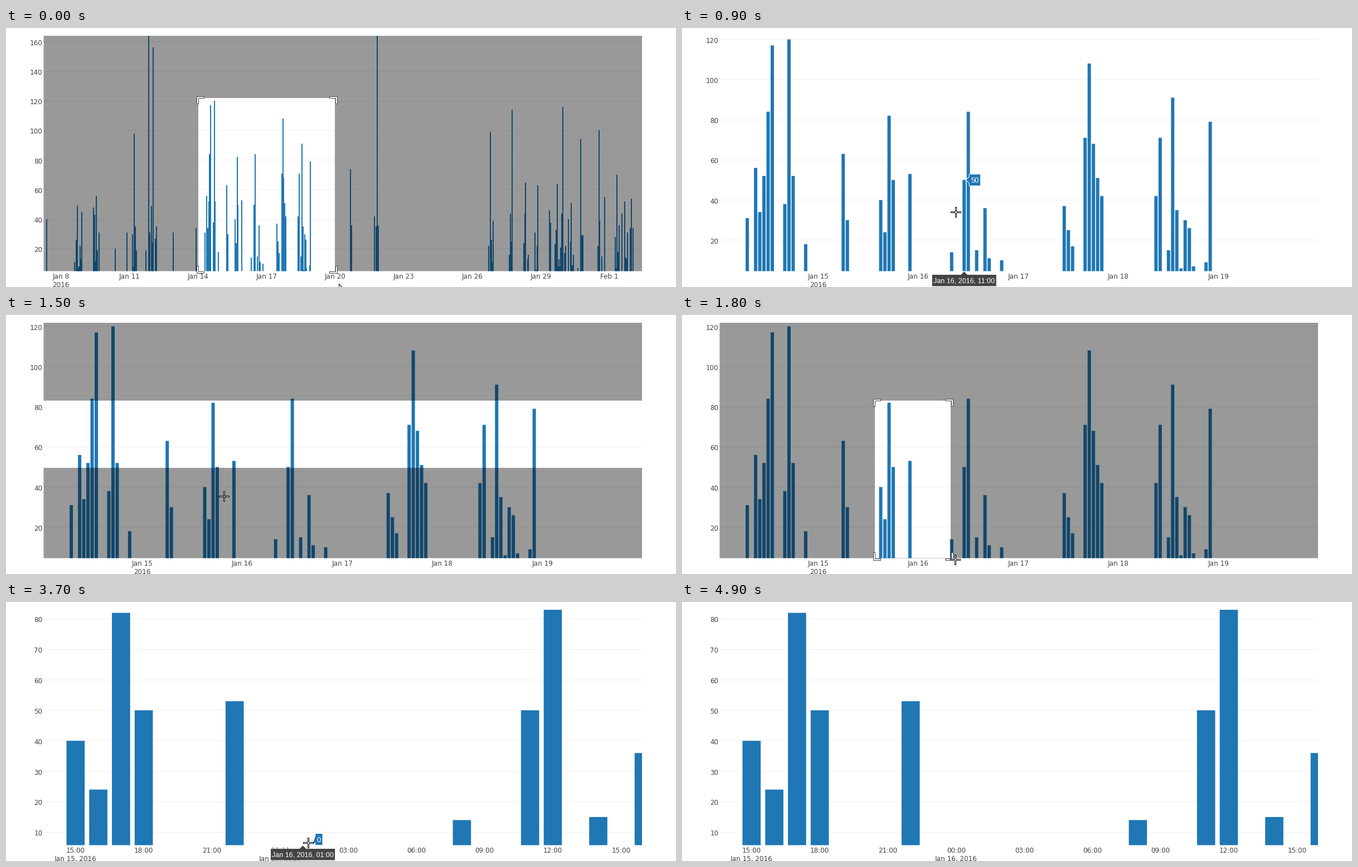
Write a matplotlib script that moves like this. It is 1202 px wide and 466 px high and loops after 5300 ms.

```python
import math
import random

import numpy as np
import matplotlib.pyplot as plt
from matplotlib.animation import FuncAnimation
from matplotlib.collections import PolyCollection
from matplotlib.patches import Polygon

W, H, DPI = 1202, 466, 100
PX = 72 / DPI
LEFT, TOP, RIGHT, BOTTOM = 67.5, 14, 1141, 437.5
BLUE, INK = "#1f77b4", "#444444"
START = (346, 154)  # where the drag begins
LAG = 0.68  # share of the latest pointer step the chart has caught up with

# The zoomed week: runs of hourly counts, keyed by hours from Jan 14
WEEK_RUNS = {
    7: [31], 9: [56, 34, 52, 84, 117], 16: [38, 120, 52], 21: [18],
    30: [63, 30], 39: [40, 24, 82, 50], 46: [53], 56: [14], 59: [50, 84],
    62: [15], 64: [36, 11], 68: [10], 83: [37, 25, 17],
    88: [71, 108, 68, 51, 42], 105: [42, 71],
    108: [15, 91, 35, 6, 30, 26, 7], 117: [9, 79],
}
# Busiest hours before and after it; quieter hours scatter around them
PEAKS = {
    -159: 40, -127: 49, -122: 45, -107: 56, -87: 20, -75: 31, -67: 98,
    -52: 170, -47: 156, -26: 31, -2: 34, 160: 74, 188: 170, 307: 99,
    330: 114, 344: 65, 357: 63, 369: 46, 377: 64, 383: 116, 392: 51,
    402: 94, 421: 100, 427: 55, 440: 70, 448: 52, 455: 54,
}


def hourly_counts():
    counts = {h + k: v for h, run in WEEK_RUNS.items()
              for k, v in enumerate(run)}
    counts.update(PEAKS)
    rng = random.Random(7)
    for hour, peak in PEAKS.items():
        for k in (-3, -2, -1, 1, 2, 3):
            if peak > 40 and rng.random() < 0.5:
                quiet = round(min(peak, 55) * rng.uniform(0.1, 0.9))
                counts.setdefault(hour + k, quiet)
    return counts


COUNTS = hourly_counts()

# Pointer moves: first frame, last frame, end point, ease-out powers, y swing
MOVES = [
    (7, 13, (346, 155), (1.35, 1.35), 0),
    (13, 14, (347, 168), (1, 1), 0),
    (14, 22, (542, 434), (1.9, 6.5), 9),
    (24, 25, (542, 433), (1, 1), 0),
    (42, 47, (622, -6), (1, 1), 0),
]

fig = plt.figure(figsize=(W / DPI, H / DPI), dpi=DPI, facecolor="white")
ax = fig.add_axes([0, 0, 1, 1])


def rects(boxes, color, z, alpha=1):
    polys = [[(l, t), (r, t), (r, b), (l, b)] for l, t, r, b in boxes]
    ax.add_collection(PolyCollection(
        polys, facecolors=color, edgecolors="none", linewidths=0,
        snap=False, alpha=alpha, zorder=z), autolim=False)


def shape(points, fill, edge, z):
    ax.add_patch(Polygon(points, closed=True, fc=fill, ec=edge, lw=PX,
                         joinstyle="miter", zorder=z))


def label(x, y, s, ha="center", size=12, color=INK, font="DejaVu Sans", z=1):
    ax.text(x, y, s, ha=ha, va="baseline", fontsize=size * PX, color=color,
            family=font, zorder=z)


def date(hour):
    day = 14 + hour // 24
    return f"Jan {day}" if day <= 31 else f"Feb {day - 31}"


def clock(hour):
    return f"{hour % 24:02d}:00"


class View:
    """A zoom state: hours counted from Jan 14 on x, counts on y."""

    def __init__(self, x0, per_hour, y0, per_count, y_ticks, x_ticks):
        self.x0, self.per_hour = x0, per_hour
        self.y0, self.per_count = y0, per_count
        self.y_ticks, self.x_ticks = y_ticks, x_ticks

    def x(self, hour):
        return self.x0 + self.per_hour * hour

    def y(self, count):
        return self.y0 - self.per_count * count

    def bar(self, hour, count):
        width = 0.8 * self.per_hour
        left, top = self.x(hour) - width / 2, self.y(count)
        if width < 2:  # hairline bars sit on whole pixels
            left, top, width = round(left), round(top), 2
        return (max(left, LEFT), max(top, TOP),
                min(left + width, RIGHT), BOTTOM)

    def draw(self):
        rows = [math.floor(self.y(v)) for v in self.y_ticks]
        rects([(LEFT, y, RIGHT, y + 1) for y in rows], "#eeeeee", 0)
        for v in self.y_ticks:
            label(65.5, self.y(v) + 6, str(v), ha="right")

        bars = [self.bar(h, v) for h, v in COUNTS.items()]
        rects([b for b in bars if b[0] < b[2] and b[1] < b[3]], BLUE, 2)

        hourly = self.x_ticks.step < 24
        for h in self.x_ticks:
            label(self.x(h), 451, clock(h) if hourly else date(h))
            if h == self.x_ticks.start or (hourly and h % 24 == 0):
                year = f"{date(h)}, 2016" if hourly else "2016"
                label(self.x(h), 466, year)

    def hover(self, x):
        hour = round((x - self.x0) / self.per_hour)
        count = COUNTS.get(hour, 0)
        cx = self.x(hour)

        # axis label
        l, r, t, b = cx - 58, cx + 58, BOTTOM + 6, BOTTOM + 27.5
        shape([(cx, BOTTOM), (cx + 6, t), (r, t), (r, b), (l, b), (l, t),
               (cx - 6, t)], INK, "white", 5)
        label(cx, 458.5, f"{date(hour)}, 2016, {clock(hour)}", size=12.5,
              color="white", font="Liberation Sans", z=6)

        # value label, kept above the plot's lower edge
        tip_x = cx + 0.4 * self.per_hour
        tip_y = min(self.y(count), BOTTOM)
        mid = min(tip_y, BOTTOM - 10.5)
        l = tip_x + 6
        r = l + 6 + 7.2 * len(str(count))
        shape([(tip_x, tip_y), (l, mid + 6), (l, mid + 10.5),
               (r, mid + 10.5), (r, mid - 10.5), (l, mid - 10.5),
               (l, mid - 6)], BLUE, "white", 5)
        label((l + r) / 2, mid + 5, str(count), size=13, color="white",
              font="Liberation Sans", z=6)


MONTH = View(344.4, 1.708, 450.7, 2.663, range(20, 161, 20),
             range(-144, 433, 72))
WEEK = View(64.75, 7.482, 454.1, 3.613, range(20, 121, 20),
            range(24, 121, 24))
DAY = View(-1465.2, 40.77, 469.1, 5.483, range(10, 81, 10), range(39, 64, 3))


def select(l, t, r, b, corners=True):
    rects([(LEFT, TOP, RIGHT, t), (LEFT, b, RIGHT, BOTTOM),
           (LEFT, t, l, b), (r, t, RIGHT, b)], "black", 3, alpha=0.4)
    if not corners:
        return
    arm = 10
    hook = [(-3.5, arm), (-0.5, arm), (-0.5, -0.5), (arm, -0.5),
            (arm, -3.5), (-3.5, -3.5)]
    for x, sx in ((l, 1), (r, -1)):
        for y, sy in ((t, 1), (b, -1)):
            shape([(x + sx * u, y + sy * v) for u, v in hook],
                  "white", INK, 4)


def arrow(x, y):
    outline = [(0, 0), (0, 16), (3.7, 12.6), (6.5, 18.5), (8.8, 17.5),
               (6.2, 11.8), (11, 11.4)]
    shape([(x + 0.5 + u, y + 0.5 + v) for u, v in outline],
          "white", "black", 7)


def cross(x, y):
    def arms(near, far, half):
        spans = ((near, far), (1 - far, 1 - near))
        return ([(x + a, y - half, x + b, y + 1 + half) for a, b in spans]
                + [(x - half, y + a, x + 1 + half, y + b) for a, b in spans])

    x, y = round(x), round(y)
    rects(arms(2, 10, 1), "black", 7)
    rects(arms(3, 9, 0), "white", 8)


def pointer(i):
    at = np.array([597.0, 460.0])
    for first, last, end, power, swing in MOVES:
        u = np.clip((i - first) / (last - first), 0, 1)
        if u > 0:
            at = at + (np.array(end) - at) * (1 - (1 - u) ** np.array(power))
            at[1] += swing * math.sin(math.pi * u)
    return at


def draw(i):
    ax.clear()
    ax.set(xlim=(0, W), ylim=(H, 0))
    ax.axis("off")

    view = MONTH if i < 4 else WEEK if i < 37 else DAY
    view.draw()

    at = pointer(i)
    seen = pointer(i - 1) + LAG * (at - pointer(i - 1))
    if i < 4:
        select(345, 126, 590, BOTTOM)
    elif 15 <= i < 37:
        x, y = round(seen[0]) + 1, min(round(seen[1]), BOTTOM)
        if x - START[0] < 40:  # nearly vertical drag: full-width band
            select(LEFT, START[1], RIGHT, y, corners=False)
        else:
            select(*START, x, y)
    elif 8 <= i < 14 or 37 <= i < 47:
        view.hover(seen[0])

    if i < 8 or 47 <= i < 49:
        arrow(*at)
    elif i < 47:
        cross(*at)
    return []


anim = FuncAnimation(fig, draw, frames=53, interval=100, repeat=True,
                     repeat_delay=0)
plt.show()
```
